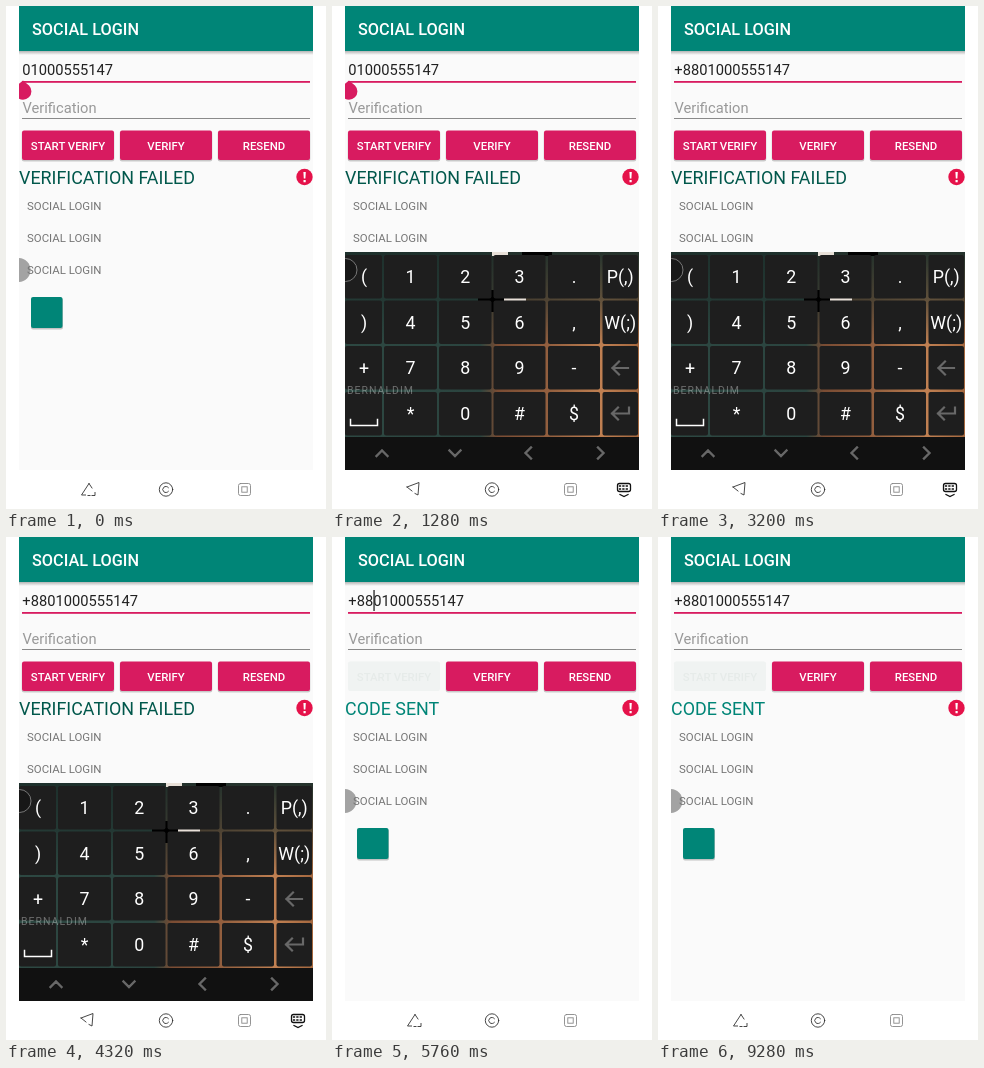
These frames come from a looping animation (320x503 px, 9.6 s). An HTML page:

```html
<!DOCTYPE html>
<html lang="en">
<head>
<meta charset="utf-8">
<title>Phone login</title>
<style>
html, body { margin: 0; width: 100%; height: 100%; overflow: hidden; background: #fff; }
svg { display: block; width: 100%; height: 100%; font-family: Roboto, sans-serif; }
.mid { text-anchor: middle; }
.btn { font-size: 11.4px; font-weight: 500; fill: #fff; text-anchor: middle; }
.row { font-size: 11.43px; fill: #757575; }
.field { font-size: 14.7px; }
.key { font-size: 17.8px; fill: #fff; text-anchor: middle; }
.line { fill: none; stroke-linecap: square; }
</style>
</head>
<body>
<svg viewBox="0 0 320 503">
  <defs>
    <clipPath id="app"><rect x="13" width="294" height="464"/></clipPath>
    <linearGradient id="shade" x2="0" y2="1">
      <stop stop-color="#000" stop-opacity=".28"/><stop offset="1" stop-color="#000" stop-opacity="0"/>
    </linearGradient>
    <linearGradient id="wall">
      <stop stop-color="#2d4842"/><stop offset=".46" stop-color="#2b443f"/>
      <stop offset=".52" stop-color="#7a4c33"/><stop offset=".7" stop-color="#94603f"/>
      <stop offset=".87" stop-color="#c08052"/><stop offset="1" stop-color="#a5683f"/>
    </linearGradient>
    <linearGradient id="dusk" x2="0" y2="1">
      <stop stop-color="#1d2f2b" stop-opacity=".95"/><stop offset=".25" stop-color="#1d2f2b" stop-opacity=".6"/>
      <stop offset=".5" stop-color="#1d2f2b" stop-opacity="0"/>
    </linearGradient>
  </defs>
  <rect width="320" height="503" fill="#fff"/>
  <g clip-path="url(#app)">
    <rect x="13" width="294" height="464" fill="#fafafa"/>
    <rect x="13" width="294" height="45" fill="#008577"/>
    <rect x="13" y="45" width="294" height="4" fill="url(#shade)"/>
    <text x="26" y="29" font-size="16.3" font-weight="500" fill="#fff">SOCIAL LOGIN</text>

    <text id="phone" class="field" x="16.3" y="69.3" fill="#212121"></text>
    <rect x="16" y="75" width="288" height="1.8" fill="#d81b60"/>
    <rect id="caret" y="53" width="1.4" height="21" fill="#333"/>
    <path id="handle" d="M17 74.5L23 79.5A8.4 8.4 0 1 1 11 79.5Z" fill="#d81b60"/>
    <text class="field" x="16.5" y="106.6" fill="#999">Verification</text>
    <rect x="16" y="112" width="288" height="1" fill="#8a8a8a"/>

    <g id="buttons"></g>
    <text id="status" x="13" y="178" font-size="17.9"></text>
    <circle cx="298.5" cy="171" r="8.2" fill="#e5124a"/>
    <path d="M297.4 166h2.4l-.4 6.5h-1.6zM297.5 174h2.2v2.2h-2.2z" fill="#fff"/>

    <text class="row" x="21" y="203.5">SOCIAL LOGIN</text>
    <text class="row" x="21" y="235.5">SOCIAL LOGIN</text>
    <circle id="bubble" cx="12.5" cy="264" r="12" fill="#a3a3a3"/>
    <text class="row" x="21" y="267.5">SOCIAL LOGIN</text>
    <rect x="25" y="292" width="32" height="31.5" rx="2" fill="#000" opacity=".22"/>
    <rect x="25" y="291" width="31.5" height="31" rx="2" fill="#008577"/>

    <g id="board">
      <rect x="13" y="246" width="294" height="186" fill="url(#wall)"/>
      <rect x="13" y="246" width="294" height="186" fill="url(#dusk)"/>
      <path d="M160 246h16v4h-16zM172 292h22v3h-22z" fill="#e8e0d8"/>
      <path d="M146 292h26v3h-26zM190 246h30v4h-30zM159 284h3v22h-3z" fill="#000"/>
      <g id="keys"></g>
      <rect x="13" y="431" width="294" height="33" fill="#111"/>
      <g class="line" stroke="#686868" stroke-width="2.4">
        <path d="M44.500 450l5.500-5.500 5.500 5.500M117.500 444.500l5.500 5.500 5.500-5.500M199 441.500l-5.500 5.500 5.500 5.500M266 441.500l5.500 5.500-5.500 5.500"/>
        <path d="M296 362H280.500M287 355.500l-6.500 6.500 6.500 6.500M297 401.500V407.500H280M286 401.500l-6 6 6 6" stroke-width="2.2"/>
      </g>
      <path class="line" d="M18.500 413.500v6h27v-6" stroke="#fff" stroke-width="1.5"/>
      <g id="popup">
        <rect y="277" width="68" height="57" rx="2" fill="#6c6c6c"/>
        <text class="mid" x="34" font-size="29" fill="#fff"></text>
      </g>
      <circle cx="13.500" cy="264" r="11.5" fill="#161616" fill-opacity=".85" stroke="#777"/>
    </g>
  </g>

  <g class="line" stroke="#333" stroke-width=".9">
    <path id="back"/>
    <circle cx="160" cy="483.500" r="6.700"/>
    <path d="M162.400 481.600a3.100 3.100 0 1 0 0 3.800"/>
    <rect x="232.500" y="477.500" width="12" height="12" rx="2" stroke="#888"/>
    <rect x="235.800" y="480.800" width="5.400" height="5.400" stroke="#888"/>
    <g id="boardIcon" stroke="#111" stroke-width="1.300">
      <rect x="285.500" y="477.500" width="13" height="8" rx="2"/>
      <path d="M287.500 480h9M287.500 483h9" stroke-dasharray="1 2.400"/>
      <path d="M288 488.500l4 2 4-2"/>
    </g>
  </g>
  <g id="pill">
    <rect x="29" y="464" width="106" height="39" rx="19" fill="#1b1b1b"/>
    <path class="line" d="M83 479l-6.500 9.500h11.500" stroke="#fff" stroke-width="2.500"/>
  </g>
</svg>
<script>
const LOOP = 9600, STEP = 160;
const NUMBER = "01000555147";
const COLS = [[13, 37], [52, 53], [107, 52.5], [161.5, 52], [216, 52], [270.5, 35.5]];
const ROWS = [249, 294.5, 340, 386];
const LABELS = ["( 1 2 3 . P(,)", ") 4 5 6 , W(;)", "+ 7 8 9 -", "_ * 0 # $"].map(r => r.split(" "));
const $ = id => document.getElementById(id);

function add(parent, tag, attrs, text) {
  const el = document.createElementNS("http://www.w3.org/2000/svg", tag);
  for (const k in attrs) el.setAttribute(k, attrs[k]);
  if (text) el.textContent = text;
  parent.appendChild(el);
  return el;
}
function show(id, on) { $(id).style.display = on ? "" : "none"; }
function within(t, a, b) { return t >= a && t < b; }

const buttons = ["START VERIFY", "VERIFY", "RESEND"].map((label, i) => {
  const x = 16 + 98 * i;
  const shadow = add($("buttons"), "rect", { x: x - .3, y: 125.5, width: 92.6, height: 30, rx: 2.5, fill: "#000", opacity: .2 });
  const face = add($("buttons"), "rect", { x, y: 124.5, width: 92, height: 29.5, rx: 2 });
  const text = add($("buttons"), "text", { class: "btn", x: x + 46, y: 143.5 }, label);
  face.setAttribute("fill", "#d81b60");
  return { shadow, face, text };
});

const keys = {};
ROWS.forEach((y, r) => COLS.forEach(([x, w], c) => {
  const face = add($("keys"), "rect", { x, y, width: w, height: 43.5, rx: 2, fill: "#1e1e1e" });
  const label = LABELS[r][c];
  if (!label || label === "_") return;
  const cx = c === 0 ? 32 : x + w / 2;
  const text = add($("keys"), "text", { class: "key", x: cx, y: y + 28 }, label);
  keys[label] = { face, text, x: cx };
}));
// faint wallpaper lettering between the lower rows
add($("keys"), "text", { x: 15, y: 388, "font-size": 10.5, "letter-spacing": 1, fill: "#fff", opacity: .35 }, "BERNALDIM");

function press(label) {
  for (const k of ["+", "8"]) {
    const on = k === label;
    keys[k].face.setAttribute("fill", on ? "#c0c0c0" : "#1e1e1e");
    keys[k].text.style.fill = on ? "#008577" : "";
  }
  show("popup", label);
  if (!label) return;
  const text = $("popup").querySelector("text");
  text.textContent = label;
  text.setAttribute("y", 317);
  $("popup").setAttribute("transform", `translate(${Math.max(13, keys[label].x - 34)} 0)`);
}

function boardLift(t) {
  if (t < 320 || t >= 5120) return 0;
  return t < 480 || t >= 4960 ? .5 : 1;
}

function caretOn(t) {
  if (t < 2240) return false;
  if (t < 3200) return true;
  return [[3680, 4160], [4800, 5280], [5760, 6240], [6720, 7200], [7680, 8320], [8800, 9280]]
    .some(([a, b]) => within(t, a, b));
}

function draw(now) {
  const t = Math.floor(now % LOOP / STEP) * STEP;
  const typed = [2240, 2560, 2720].filter(at => t >= at).length;
  $("phone").textContent = "+88".slice(0, typed) + NUMBER;
  show("caret", caretOn(t));
  $("caret").setAttribute("x", 16 + 8.45 * typed);
  show("handle", t < 1920);

  const lift = boardLift(t), open = lift === 1;
  show("board", lift > 0);
  $("board").setAttribute("transform", `translate(0 ${218 * (1 - lift)})`);
  show("bubble", !open);
  show("boardIcon", open);
  $("back").setAttribute("d", open
    ? "M75 481l12-4.500-1 12.500-3-1.500M75 481l5 4"
    : "M83 477.500l-7.500 11.500h4M83 477.500l3 4.500M82 489.500h2M86 489.500h3v-3");
  press(within(t, 1920, 2240) ? "+" : within(t, 2400, 2880) ? "8" : "");

  show("pill", within(t, 4800, 5280));
  const sent = t >= 5760, first = buttons[0];
  first.face.setAttribute("fill", sent ? "#f0f3f2" : within(t, 5440, 5760) ? "#e0457d" : "#d81b60");
  first.text.style.fill = sent ? "#e6ebe9" : "";
  first.shadow.style.display = sent ? "none" : "";
  $("status").textContent = sent ? "CODE SENT" : "VERIFICATION FAILED";
  $("status").setAttribute("fill", sent ? "#008577" : "#00574b");
}

const start = performance.now();
function tick() {
  draw(performance.now() - start);
  requestAnimationFrame(tick);
}
tick();
</script>
</body>
</html>
```
